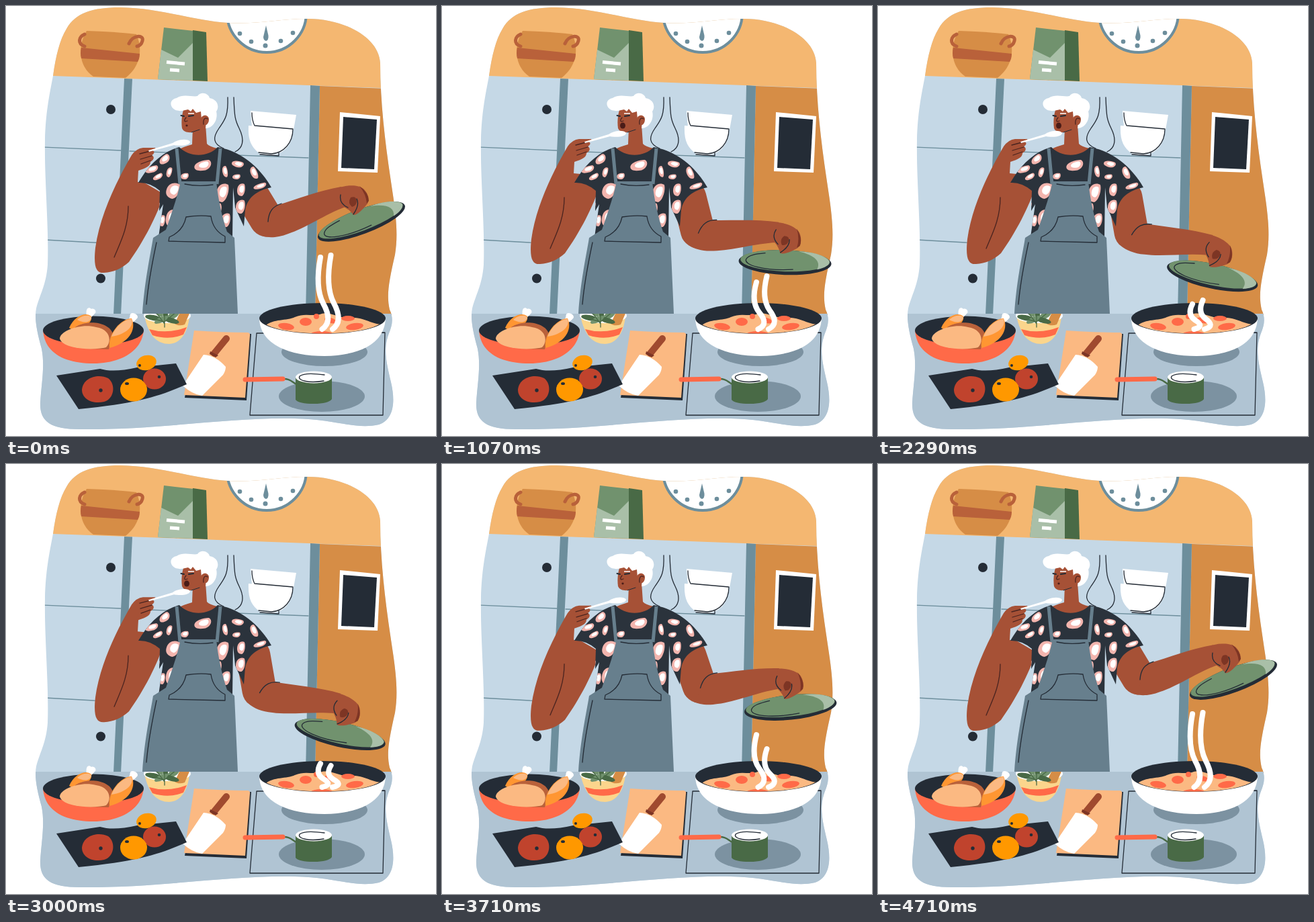
These frames come from a looping animation (640 px wide and 640 px high, 4780 ms). An HTML page:

```html
<!DOCTYPE html>
<html lang="en">
<head>
<meta charset="utf-8">
<title>Cooking</title>
<style>
html, body { margin: 0; height: 100%; overflow: hidden; background: #fff; }
svg { display: block; width: 100%; height: 100%; }
.line { fill: none; stroke: #242c36; stroke-width: 1.3; stroke-linecap: round; stroke-linejoin: round; }
.dark { fill: #242c36; } .white { fill: #fff; } .skin { fill: #a65136; } .shade { fill: #7d3524; }
.steel { fill: #6d8e9c; } .ochre { fill: #d68d46; } .clay { fill: #b9613a; } .peach { fill: #fbb982; }
.coral { fill: #ff6a48; } .orange { fill: #ff9800; } .red { fill: #c0432d; }
.moss { fill: #496a46; } .green { fill: #71926e; } .mint { fill: #a9bfa8; } .shadow { fill: #7c92a1; }
</style>
</head>
<body>
<svg viewBox="0 0 640 640">
<defs>
  <clipPath id="blob"><path d="M70 104C74 75 80 50 90 34C103 10 130 2 170 2C230 3 280 22 330 25C370 28 410 19 447 19C500 18 555 45 557 85C557 150 566 215 575 275C582 320 583 345 579 370C570 410 566 430 571 452C577 464 575 475 570 487C561 510 566 530 573 560C580 590 577 615 555 623C520 631 490 615 430 614C330 612 230 631 110 630C65 630 50 618 51 590C53 560 58 535 53 510C46 485 42 465 45 450C50 430 60 415 62 385C64 330 57 260 58 200C59 160 64 135 70 104Z"/></clipPath>
  <path id="shirtShape" d="M258 210C272 225 300 226 315 210C345 215 375 235 395 270C372 275 360 285 356 303L354 328L341 300L338 270L337 346L227 344L234 295L228 305L229 275Q214 262 197 263C213 235 235 216 258 210Z"/>
  <clipPath id="shirtClip"><use href="#shirtShape"/></clipPath>
  <clipPath id="panClip"><ellipse cx="471" cy="465" rx="92" ry="22.5"/></clipPath>
</defs>

<g clip-path="url(#blob)">
  <path fill="#c5d8e6" d="M0 0H640V640H0Z"/>
  <path fill="#f4b771" d="M0 0H640V125L558 122L70 104L0 101Z"/>
  <path class="ochre" d="M467 119L640 126V460H460Z"/>
  <path class="line" style="stroke:#6d8e9c" d="M55 210L171 215M184 216L450 226M58 348L166 354"/>
  <path class="steel" d="M176 108L188 108.500L171 460H160ZM453 118L467 119L460 460H446Z"/>
  <path fill="#b0c4d3" d="M0 458H640V640H0Z"/>
  <circle class="white" cx="388" cy="10" r="59" stroke="#6d8e9c" stroke-width="4"/>
  <g class="steel">
    <circle cx="348" cy="41" r="3.300"/><circle cx="365" cy="53" r="3.300"/><circle cx="386" cy="59" r="3.500"/>
    <circle cx="409" cy="52" r="3.300"/><circle cx="427" cy="40" r="3.300"/>
    <path d="M387 29L390.500 44Q391 51 387 52Q383 51 383 46Z"/>
  </g>
</g>

<g id="shelf">
  <path class="ochre" d="M120 37Q160 38 194 42C203 62 202 88 178 107L130 105C108 90 106 60 120 37Z"/>
  <path class="clay" d="M112 62L199 71Q199 78 196 83L112 78Q110 70 112 62Z"/>
  <path fill="none" stroke="#b9613a" stroke-width="5" stroke-linecap="round" d="M117 60C106 56 108 46 117 42M183 56C188 43 206 42 203 52Q201 59 195 60"/>
  <path class="green" d="M235 32L279 37V111L226 109Z"/>
  <path class="mint" d="M231 65L256 77L278 55V111L226 109Z"/>
  <path class="moss" d="M278 36L298 39L300 112L278 111Z"/>
  <path fill="none" stroke="#fff" stroke-width="5" d="M239 83.500L266 86M244 95L258 96"/>
</g>

<g id="wall">
  <circle class="dark" cx="156" cy="154" r="7"/><circle class="dark" cx="141" cy="405.500" r="7"/>
  <path class="white" d="M497 158L557 164L553 248L494 246Z"/>
  <path class="dark" d="M502 165L552 169L548 243L499 241Z"/>
  <path class="line" d="M330 136C331 165 325 170 317 182C308 195 307 205 324 212M339 136C340 165 341 170 347 182C356 200 352 212 341 217"/>
  <path class="white" d="M364 156L432 162L428 184L366 180ZM361 178L427 183C427 205 415 220 395 222L378 220C365 210 360 200 361 178Z"/>
  <path class="line" d="M366 159Q366 170 370 178L427 183C427 204 413 219 395 220L376 218M378 221L406 223V219"/>
</g>

<g id="pan">
  <path class="coral" d="M55 482C57 517 88 532 130 532C173 532 203 512 205 482Z"/>
  <ellipse class="dark" cx="130" cy="483" rx="75" ry="21.500"/>
  <path class="white" d="M120 461C118 450 123 447 127 451C131 449 137 455 131 459L124 466Z"/>
  <path fill="#ff9632" d="M94 479C102 460 120 455 127 462C129 471 116 480 102 484Z"/>
  <path class="peach" d="M106 467C115 458 128 460 127 465C123 474 111 470 106 467Z"/>
  <path class="clay" d="M103 478C120 466 154 470 159 488L153 511L118 510Z"/>
  <path class="peach" d="M80 495C81 483 112 472 134 478C155 481 158 499 149 508C130 513 85 511 80 495Z"/>
  <path class="white" d="M181 467C187 464 182 458 188 457C194 457 199 463 194 466C192 469 190 469 187 473Z"/>
  <path fill="#ff9632" d="M154 509C151 488 171 465 187 465C195 482 182 502 154 509Z"/>
  <path class="peach" d="M157 492C163 476 177 466 187 466C191 477 178 489 157 492Z"/>
</g>

<g id="salad">
  <path fill="#fbd58c" d="M206 461C212 490 224 503 243 503C260 502 270 487 273 463Z"/>
  <path class="coral" d="M213 481Q240 489 269 478L264 489Q242 498 218 490Z"/>
  <ellipse class="white" cx="240" cy="461" rx="35" ry="11"/>
  <path class="ochre" d="M251 473L265 443C270 435 282 435 279 444L266 474Q258 477 251 473Z"/>
  <g id="leaves"></g>
</g>

<g id="board">
  <path class="dark" d="M283 486L365 488L358 587L266 583Z"/>
  <path class="peach" d="M280 483Q322 486 360 486Q364 487 363 491L356 583L265 579Z"/>
  <path class="white" d="M294 519Q312 520 327 537Q327 543 323 549L292 580Q277 578 263 565Z"/>
  <path stroke="#a04a2f" stroke-width="10" stroke-linecap="round" d="M310 517L328 495"/>
  <path class="shade" d="M304 514L316 520L312 523L303 518Z"/>
</g>

<g id="fruit">
  <path class="dark" d="M75 550L140 540Q160 546 195 538L253 532L269 563C230 580 200 591 108 600Z"/>
  <path class="red" d="M113 571C115 552 138 547 152 554C164 563 161 585 146 589C128 593 113 585 113 571Z"/>
  <ellipse class="red" cx="221" cy="555" rx="17" ry="15.500"/>
  <ellipse class="orange" cx="190" cy="571" rx="20" ry="17.500"/>
  <ellipse class="orange" cx="209" cy="531" rx="15" ry="11" transform="rotate(-15 209 531)"/>
  <g class="dark"><circle cx="141" cy="572" r="2.700"/><circle cx="228" cy="552" r="2.300"/><ellipse cx="180" cy="562" rx="3" ry="2"/><circle cx="199" cy="535" r="2"/></g>
</g>

<g id="stove">
  <path class="line" d="M373 487L564 486L561 609L363 609Z"/>
  <ellipse class="shadow" cx="474" cy="515" rx="64" ry="21"/>
  <path class="white" d="M377 465C378 503 420 521 474 521C528 520 563 502 565 465Z"/>
  <ellipse class="dark" cx="471" cy="465" rx="94" ry="23"/>
  <g clip-path="url(#panClip)">
    <path class="peach" d="M386 476C398 465 418 469 430 463C445 456 458 463 470 458C485 455 500 467 515 464C535 464 540 472 558 474V495H386Z"/>
    <g class="coral" id="pieces"></g>
  </g>
  <ellipse class="shadow" cx="470" cy="581" rx="64" ry="23"/>
  <path class="moss" d="M431 552H485V585Q480 592 458 592Q436 592 431 586Z"/>
  <ellipse class="white" cx="458" cy="552.500" rx="27" ry="9"/>
  <path class="line" d="M473 558C450 562 433 557 437 551C443 546 460 547 474 549"/>
  <path fill="none" stroke="#496a46" stroke-width="2.500" d="M414 555C425 555 426 561 433 563"/>
  <path fill="none" stroke="#ff6a48" stroke-width="7" stroke-linecap="round" d="M356 556L412 555"/>
</g>

<g id="leftArm">
  <path class="skin" d="M187 222C165 260 140 310 133 360C130 388 134 398 146 397C160 396 172 391 183 381C205 350 225 312 235 280L206 263L196 262L197 245C209 241 215 238 215 232C221 229 221 224 217 222C222 219 221 216 218 215Q224 214 222 211L204 211Q194 212 187 222Z"/>
  <path class="line" style="stroke:#4a2420" d="M182 298C182 330 170 352 161 374M199 220L218 215M200 228L217 223M201 235L215 230"/>
</g>

<path id="upperArm" stroke="#a65136" stroke-width="51" stroke-linecap="round"/>
<g id="foreArm">
  <path class="skin" d="M402 297C435 287 465 275 499 269L505 299C475 310 445 331 420 339C405 345 392 345 384 343Z"/>
  <path class="line" d="M390 321C391 306 397 298 410 294"/>
  <g id="hand">
    <g transform="translate(529 321) rotate(-20.500)">
      <ellipse class="dark" rx="69" ry="18.500"/>
      <ellipse class="green" cy="-2.500" rx="66.500" ry="16"/>
      <path class="mint" d="M20 -17C44 -12 54 -3 48 9C60 6 67 1 66 -4C60 -12 42 -17 20 -17Z"/>
      <path class="line" d="M12 10C-30 14 -62 6 -58 -3C-55 -9 -45 -11 -30 -13"/>
    </g>
    <path class="skin" d="M496 270C510 266 525 266 532 272C540 280 541 289 538 294C532 302 522 312 517 311C512 304 508 302 503 299C497 295 496 290 498 280Z"/>
    <path class="shade" d="M513 285Q521 282 522 290Q522 297 515 299Q508 293 513 285ZM526 268Q540 278 540 290L537 294Q536 280 526 268Z"/>
    <path class="line" d="M498 281C496 291 502 297 509 300M522 287C526 295 522 303 517 310"/>
  </g>
</g>

<g id="body">
  <path class="skin" d="M278 180L277 206Q263 210 258 213C272 229 302 228 315 212Q302 209 299 205L297 176Z"/>
  <use href="#shirtShape" fill="#2b333c"/>
  <g id="spots" clip-path="url(#shirtClip)"></g>
  <path fill="none" stroke="#677f8d" stroke-width="5" d="M259 265L254 212M314 265L319 212"/>
  <path fill="#677f8d" d="M260 261H313C316 290 322 315 329 336L340 345L345 458H203C206 410 215 370 219 345L238 333C246 310 255 285 260 261Z"/>
  <path class="line" d="M266 265Q285 269 308 266M268 314Q287 311 305 313Q308 334 326 343V352L242 350L243 344C257 338 265 329 268 314M224 352C217 385 211 420 209 444"/>
</g>

<g id="head">
  <path class="skin" d="M264 155C261 165 261 175 262 182C265 189 274 189 282 187C291 184 300 178 299 165L290 154L275 150Z"/>
  <path class="white" d="M262 156C245 158 239 140 254 137C264 130 278 136 285 134C291 126 302 131 303 137C315 139 318 150 313 157C316 169 308 182 297 182Q300 172 291 169L290 157L283 159L278 153L275 157L271 154Z"/>
  <path class="skin" d="M289 170C291 160 302 161 302 169C302 177 294 181 289 177Z"/>
  <path class="line" style="stroke:#4a2420" d="M294 176C293 168 297 165 300 168M268 166Q264 171 267 172L270 171"/>
  <path class="line" style="stroke-width:2" d="M260.500 163L265 164M272 164L279 163"/>
  <path fill="none" stroke="#fff" stroke-width="1.500" d="M271 160L280 160"/>
  <path class="line" style="stroke-width:1" d="M276 188L288 184"/>
  <ellipse id="mouth" cx="269" cy="178" fill="#4a1c18"/>
</g>
<path id="spoon" class="white" d="M212 215L248 204C256 198 271 197 274 202C274 207 262 209 250 207L213 217Z"/>
<path id="steam" fill="none" stroke="#fff" stroke-width="8" stroke-linecap="round" stroke-linejoin="round"/>
</svg>

<script>
const LOOP = 4780, STEPS = 67;
const el = id => document.getElementById(id);
const ellipse = ([x, y, rx, ry, turn = 0], cls = '') =>
  `<ellipse class="${cls}" rx="${rx}" ry="${ry}" transform="translate(${x} ${y}) rotate(${turn})"/>`;

el('pieces').innerHTML = [[417, 477, 12, 5, 8], [446, 470, 9, 6], [462, 462, 4, 4], [470, 488, 16, 4],
  [519, 477, 13, 5, -8], [509, 465, 10, 4], [483, 468, 9, 4, 15]].map(p => ellipse(p)).join('');

el('leaves').innerHTML = [[219, 464, 12, 4, 10], [225, 455, 11, 4, 40], [237, 456, 11, 4, 85], [249, 460, 11, 5, -35],
  [246, 468, 12, 4, 15], [231, 467, 11, 4, -25]].map((p, i) => ellipse(p, i % 2 ? 'green' : 'moss')).join('') +
  '<path class="line" style="stroke:#496a46" d="M219 450L236 473L236 449M210 463L236 470L254 455M236 478V468"/>';

// x, y, half width, half height, turn
const spots = [[236, 228, 9, 6, -35], [217, 243, 10, 5, -15], [226, 254, 8, 4, -25], [243, 247, 4, 8, 10], [249, 274, 10, 13, 15],
  [293, 237, 13, 8, -10], [266, 253, 6, 5, 0], [326, 246, 4, 9, -15], [345, 235, 9, 5, 15], [343, 254, 6, 4, 0],
  [369, 248, 5, 10, -30], [350, 273, 6, 10, 0], [378, 268, 10, 4, -15], [322, 277, 9, 15, 8], [349, 298, 7, 11, 0],
  [327, 318, 7, 11, 0], [246, 315, 8, 14, 5], [314, 302, 7, 10, 0], [232, 319, 5, 9, 0], [223, 298, 5, 8, 20]];
const egg = 'M-1 .2C-1-.8 .2-1 .8-.8C1.200-.3 .9 .8 .2 1C-.6 1-1 .7-1 .2Z';
el('spots').innerHTML = spots.map(([x, y, w, h, turn]) =>
  `<g transform="translate(${x} ${y}) rotate(${turn}) scale(${w} ${h})">
    <path fill="#f3b5ae" d="${egg}"/><path fill="#fff" transform="translate(.12 -.08) scale(.58)" d="${egg}"/></g>`).join('');

// Smooth curve through [time, value] keys, flat at peaks and plateaus.
function curve(keys) {
  const rate = i => (keys[i + 1][1] - keys[i][1]) / (keys[i + 1][0] - keys[i][0]);
  const slope = i => {
    if (!i || i === keys.length - 1) return 0;
    const a = rate(i - 1), b = rate(i);
    return a * b > 0 ? 2 * a * b / (a + b) : 0;
  };
  return t => {
    let i = 0;
    while (i < keys.length - 2 && t >= keys[i + 1][0]) i++;
    const [t0, a] = keys[i], [t1, b] = keys[i + 1], d = t1 - t0, u = (t - t0) / d, v = 1 - u;
    return a * v * v * (1 + 2 * u) + b * u * u * (1 + 2 * v) + d * u * v * (slope(i) * v - slope(i + 1) * u);
  };
}

const raise = curve([[0, 0], [430, .93], [570, .98], [1100, 1], [2950, 1], [3250, .65], [3700, .02], [4050, 0], [LOOP, 0]]);
const lower = curve([[0, 0], [580, 0], [800, .35], [1070, .68], [1140, .73], [1790, .92], [2290, .99], [2860, 1.010],
  [3000, 1], [3430, .62], [3710, .44], [4000, .22], [4570, .015], [LOOP, 0]]);
const leftTop = curve([[0, 374], [570, 394], [1070, 411], [1790, 433], [2700, 448], [3000, 446], [3710, 403], [4710, 372], [LOOP, 374]]);
const rightTop = curve([[0, 371], [570, 385], [1070, 402], [1790, 425], [3000, 449], [3710, 424], [4500, 374], [4710, 370], [LOOP, 371]]);

function strand(x, top) {
  const p = (dx, f) => `${x + dx} ${481 - (481 - top) * f}`;
  return `M${p(0, 1)}C${p(-5, .75)} ${p(-5, .52)} ${p(4, .36)}C${p(13, .21)} ${p(15, .08)} ${p(2.500, 0)}`;
}

function draw(now) {
  const t = Math.floor(now % LOOP / LOOP * STEPS) * LOOP / STEPS;
  const up = raise(t), down = lower(t);

  const lift = `translate(0 ${-13 * up})`;
  el('leftArm').setAttribute('transform', lift);
  el('spoon').setAttribute('transform', lift);
  el('mouth').setAttribute('rx', 1.600 + 2.400 * up);
  el('mouth').setAttribute('ry', 1.400 + 3.200 * up);

  const dx = -11 * down, dy = 19 * Math.sin(down * Math.PI / 2);
  el('upperArm').setAttribute('d', `M368 285L${388 + dx} ${318 + dy}`);
  el('foreArm').setAttribute('transform', `translate(${dx} ${dy}) rotate(${26 * down} 388 318)`);
  el('hand').setAttribute('transform', `rotate(${7 * down} 500 288)`);

  el('steam').setAttribute('d', strand(468, leftTop(t)) + strand(483.500, rightTop(t)));
  requestAnimationFrame(() => draw(performance.now() - start));
}
const start = performance.now();
draw(0);
</script>
</body>
</html>
```
